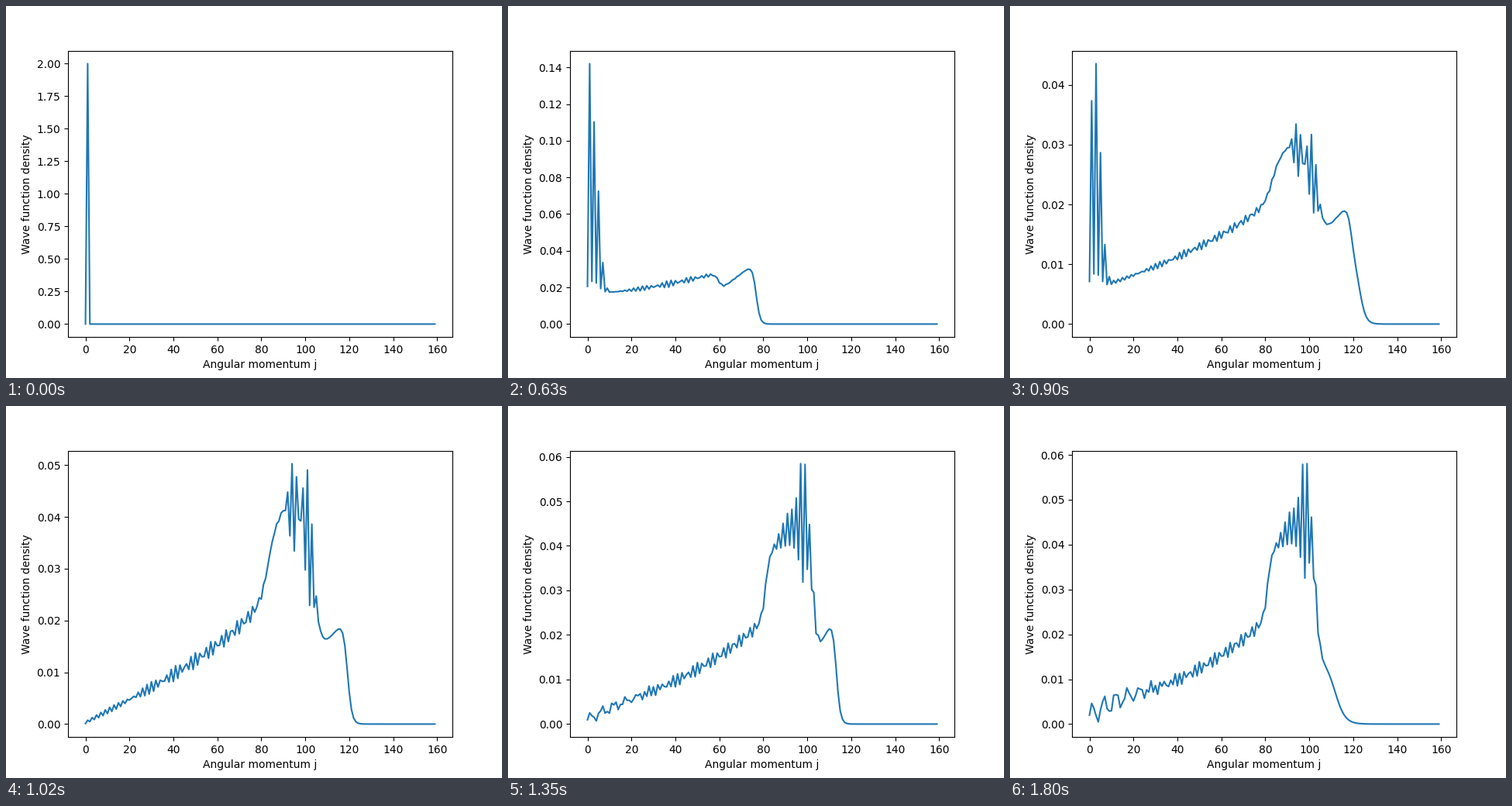
Write a matplotlib script that moves like this. It is 640x480 px and loops after 1.83 s.

```python
import numpy as np
import matplotlib.pyplot as plt
from matplotlib.animation import FuncAnimation

FRAMES, INTERVAL = 61, 30
START, SPREAD = 14, 26           # frames where spreading begins and ends
KEYS = [34, 40, 50, 60]          # frames of the settled poses
J = np.arange(160)
ODD = -np.cos(np.pi * J)         # +1 for odd j, -1 for even j

# Densities are in units of 0.001. One row per pose:
# hump (centre, width, height), edge (centre, width),
# spike (centre, size, skew), beat (centre, size, width),
# shelf (level, slope), front (centre, width), swell
POSES = np.array([
    [83.2, 1.7, 12.7, 104, 1.6, 101.3, 12.5, -0.1, 94.7, -10, 2.6,
     15.3, 0.55, 119.1, 1, 0],
    [81, 0.9, 14, 102.4, 1.1, 98.1, 16.4, 0.25, 91, 2.2, 5,
     28.4, 2.2, 112.3, 1.05, 0],
    [81, 0.9, 14, 102.9, 1, 98.1, 12.8, 0.25, 91, 2.2, 5,
     13.4, 0, 113.9, 0.75, 1],
    [81, 0.9, 14, 102.9, 1, 98.1, 13.95, 0.25, 91, 2.2, 5,
     14.5, 0, 111.7, 2.3, 1.1]])


def rise(x, centre, width):
    """Smooth step from 0 to 1."""
    return 0.5 + 0.5 * np.tanh((x - centre) / (2 * width))


def bell(x, centre, width):
    return np.exp(-((x - centre) / width) ** 2)


def ripple(shift):
    """Even-odd alternation whose sign flips ever faster with j."""
    return -np.cos(np.pi * (J + J**2 / 800 + shift))


def with_shelf(x, body, edge, shelf, front):
    """Body that drops at the edge to a sloping shelf, then to zero."""
    past = rise(x, *edge)
    level = np.maximum(shelf[0] + shelf[1] * (x - 109), 0)
    return body * (1 - past) + level * past * (1 - rise(x, *front))


def spreading(u):
    """Density while the initial state spreads out, u from 0 to 1."""
    stretch = max(u * u * (3 - 2 * u), 0.01)
    x = np.minimum(J / stretch, 200)
    body = 11 + 6.2 * (x / 85) ** 1.6
    flat = with_shelf(x, body, (96, 1.5), (17, 0.38), (122.9, 1.4))
    flat += 1.2 * bell(x, 60, 32) * ripple(-0.7)

    low = 76.5 * bell(J, 2.5, 3.4) * np.where(J % 2, 1, 0.07)
    rest = low.sum()
    kept = 2000 * (rest / 2000) ** (u ** 0.35)
    mix = u ** 0.3
    start = (1 - mix) * (J == 1) + mix * low / rest
    return kept * start + flat * (2000 - kept) / (2000 - rest) / stretch


def settled(k):
    """Rippled ramp, a hump with alternating spikes, and the front."""
    (hump, hump_w, height, edge, edge_w, spike, size, skew,
     beat, beat_size, beat_w, level, slope, front, front_w,
     swell) = [np.interp(k, KEYS, column) for column in POSES.T]

    x = np.minimum(J, 91)
    body = 0.3 + 0.22 * x / np.sqrt(1 - (x / 125) ** 2)
    body += height * rise(J, hump, hump_w)
    y = with_shelf(J, body, (edge, edge_w), (level, slope), (front, front_w))

    y += (np.minimum(0.2 + 0.03 * J, 1.5) * (1 - rise(J, 80, 2))
          * ripple(-0.05))
    peak = size / (1 + ((J - spike) / 2.2) ** 2) * (1 - rise(J, 105, 0.5))
    y += peak * (ODD + skew) * rise(J, 84, 1.5)
    y += beat_size * bell(J, beat, beat_w) * ODD

    wave = np.cos(2 * np.pi * (J - 1.2) / 5.35)
    y += swell * (2 * bell(J, 12, 20) + 2.1 * bell(J, 0, 28) * wave)
    return np.maximum(y, 0)


def density(k):
    if k <= SPREAD:
        y = spreading(max(0, (k - START) / (SPREAD - START)))
    else:
        w = min((k - SPREAD) / (KEYS[0] - SPREAD), 1)
        y = (1 - w) * spreading(1) + w * settled(k)
    return y / 1000


fig, ax = plt.subplots(figsize=(6.4, 4.8), dpi=100)
line, = ax.plot(J, density(0), color="#1f77b4", lw=1.5)
ax.set_xlabel("Angular momentum j")
ax.set_ylabel("Wave function density")


def update(k):
    line.set_ydata(density(k))
    ax.relim()
    ax.autoscale_view()
    return line,


anim = FuncAnimation(fig, update, frames=FRAMES, interval=INTERVAL,
                     repeat=True, repeat_delay=0, blit=False)
plt.show()
```
